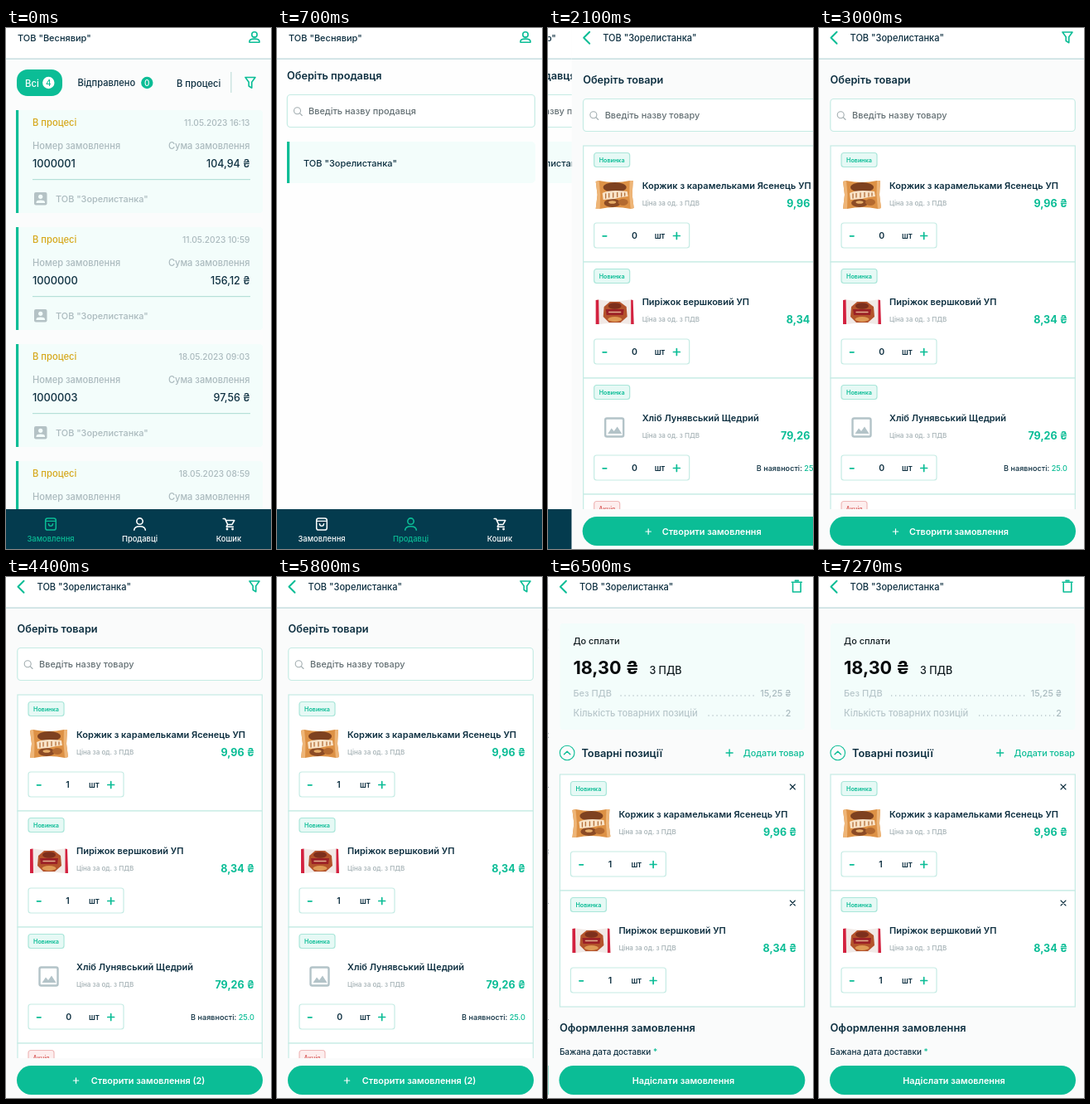
Animation of 320x628 px, one loop 7.43 s. Source, as an HTML page:

```html
<!DOCTYPE html>
<html lang="uk">
<head>
<meta charset="utf-8">
<title>Замовлення</title>
<style>
html, body { margin: 0; width: 100%; height: 100%; overflow: hidden; background: #fff; }
svg { display: block; width: 320px; height: 628px; font-family: Inter, "Noto Sans", sans-serif; }
text { white-space: pre; }
</style>
</head>
<body>
<svg id="stage" viewBox="0 0 320 628" xmlns="http://www.w3.org/2000/svg"></svg>
<script>
const LOOP = 7430;
const GREEN = '#0bbd96', NAVY = '#043b4e', INK = '#0d2f40', GREY = '#abbabe', GOLD = '#d6a81c';
const EDGE = '#c5ebe4', MINT = '#f3fdfb';
const BUYER = 'ТОВ "Веснявир"', SELLER = 'ТОВ "Зорелистанка"';

// y is the middle of the capital letters
const text = (x, y, str, size, fill = INK, weight = 500, anchor = 'start', id = '') =>
  `<text ${id && `id="${id}"`} x="${x}" y="${y + size * 0.36}" font-size="${size}" fill="${fill}" font-weight="${weight}" text-anchor="${anchor}">${str}</text>`;
const rect = (x, y, w, h, fill, r = 0, stroke = 'none') =>
  `<rect x="${x}" y="${y}" width="${w}" height="${h}" rx="${r}" fill="${fill}" stroke="${stroke}" stroke-width="1.2"/>`;
const line = (d, stroke = GREEN, width = 1.5) =>
  `<path d="${d}" fill="none" stroke="${stroke}" stroke-width="${width}" stroke-linecap="round" stroke-linejoin="round"/>`;
const shape = (d, fill) => `<path d="${d}" fill="${fill}"/>`;
const dot = (x, y, r, fill) => `<circle cx="${x}" cy="${y}" r="${r}" fill="${fill}"/>`;
const oval = (x, y, rx, ry, fill) => `<ellipse cx="${x}" cy="${y}" rx="${rx}" ry="${ry}" fill="${fill}"/>`;
const at = (x, y, body, id = '') => `<g ${id && `id="${id}"`} transform="translate(${x} ${y})">${body}</g>`;
const plus = (x, y, r, color = GREEN, width = 1.5) => line(`M${x - r} ${y}h${2 * r}M${x} ${y - r}v${2 * r}`, color, width);

const filterIcon = (x, y) => at(x, y, line('M-6-6.5H6L1.8-.8V6.2L-1.8 4V-.8Z', GREEN, 1.6));
const headerBar = () => rect(0, 0, 320, 37, '#fff') + rect(0, 36.5, 320, 1.4, '#c3dcde');
const personIcon = (x, y, color) => at(x, y,
  `<circle cy="-3.6" r="3.2" fill="none" stroke="${color}" stroke-width="1.6"/>` +
  line('M-6 5.8V4.6C-6 2.6-3 1.6 0 1.6S6 2.6 6 4.6V5.8Z', color, 1.6));
const back = () => line('M21.5 4.8L14.5 11.8L21.5 18.8', GREEN, 2);
const magnifier = (x, y) => at(x, y,
  `<circle cx="-.8" cy="-.8" r="4" fill="none" stroke="#a2adb0" stroke-width="1.1"/>` + line('M2.2 2.2L5 5', '#a2adb0', 1.1));

function tabBar(active) {
  const c = i => i === active ? GREEN : '#fff';
  const bag = at(54, 598,
    `<rect x="-6.3" y="-7" width="12.6" height="14" rx="2.6" fill="none" stroke="${c(0)}" stroke-width="1.5"/>` +
    line('M-6-3.6H6M-2.6-.3C-2.2 3.2 2.2 3.2 2.6-.3', c(0), 1.4));
  const person = at(161.5, 598,
    `<circle cy="-3.4" r="3.7" fill="none" stroke="${c(1)}" stroke-width="1.6"/>` +
    line('M-6.8 7.2C-6.2 1.2 6.2 1.2 6.8 7.2', c(1), 1.6));
  const cart = at(269, 598,
    line('M-6.8-6.6H-4.6L-1.4.4H4L6.8-4.4H-3.4M-1.4.4L-2.8 3.2H5.4', c(2), 1.5) +
    dot(-2, 6, 1.4, c(2)) + dot(4.6, 6, 1.4, c(2)));
  const label = (x, str, i) => text(x, 616, str, 9.4, c(i), 500, 'middle');
  return rect(0, 580, 320, 48, NAVY) + bag + person + cart +
    label(54, 'Замовлення', 0) + label(161.5, 'Продавці', 1) + label(269, 'Кошик', 2);
}

function order(y, date, number, sum) {
  return at(0, y,
    rect(12, 0, 298, 124, MINT, 4) + rect(12, 0, 3.2, 124, GREEN) +
    text(32, 15, 'В процесі', 11.2, GOLD) +
    text(294.5, 15, date, 10.2, GREY, 500, 'end') +
    text(32, 43.5, 'Номер замовлення', 11.1, GREY) +
    text(294.5, 43.5, 'Сума замовлення', 11.1, GREY, 500, 'end') +
    text(32, 64.5, number, 12.8) +
    text(294.5, 64.5, sum, 12.5, INK, 500, 'end') +
    rect(32, 83, 263, 1.2, '#b5e0d8') +
    rect(34, 99, 15.5, 15.5, '#b4c2c5', 2) + dot(41.7, 104.3, 2.6, MINT) +
    shape('M36.5 112V111C36.5 107.8 47 107.8 47 111V112Z', MINT) +
    text(60, 107, SELLER, 10.9, GREY));
}

const orders = () =>
  rect(0, 0, 320, 628, '#fbfcfc') + headerBar() +
  text(14, 12.5, BUYER, 11) + personIcon(300, 11.5, GREEN) +
  rect(13, 50, 55, 32, GREEN, 13) + text(23, 66.5, 'Всі', 11.3, '#fff') +
  dot(51.3, 66, 7.2, '#fff') + text(51.3, 66.2, '4', 10, GREEN, 500, 'middle') +
  text(86.5, 66.5, 'Відправлено', 11.1) +
  dot(170.3, 66, 7.2, GREEN) + text(170.3, 66.2, '0', 10, '#fff', 500, 'middle') +
  text(206, 66.5, 'В процесі', 11.2) +
  rect(271.3, 53, 1.1, 25, '#bcdcd8') + filterIcon(295, 66) +
  order(99, '11.05.2023 16:13', '1000001', '104,94 ₴') +
  order(240, '11.05.2023 10:59', '1000000', '156,12 ₴') +
  order(381, '18.05.2023 09:03', '1000003', '97,56 ₴') +
  order(522, '18.05.2023 08:59', '1000002', '83,40 ₴') +
  tabBar(0);

const sellers = () =>
  rect(0, 0, 320, 628, '#fefefe') + headerBar() +
  text(14, 12.5, BUYER, 11) + personIcon(300, 11.5, GREEN) +
  text(12, 57, 'Оберіть продавця', 12.7, INK, 600) +
  rect(12.3, 80.5, 299, 39, '#fff', 4, EDGE) + magnifier(25.3, 100.5) +
  text(38, 100, 'Введіть назву продавця', 10.95, '#647074') +
  rect(12, 137, 300, 50, MINT, 5) + rect(12, 137, 3.2, 50, GREEN) +
  text(32, 163, SELLER, 11) +
  tabBar(1);

// product pictures, about 46 by 34
const orangePack = () =>
  shape('M29 43L33 42Q52 46 70 42L74 42L73 59L75 75L71 76Q52 72 34 76L29 76L31 59Z', '#dd9145') +
  shape('M29 43L33 42L34.5 59L34 76L29 76L31 59ZM70 42L74 42L73 59L75 75L71 76L69.5 59Z', '#eeb577') +
  oval(52, 50, 14, 6, '#7e4120') + oval(49, 69, 10, 5, '#8c4b25') + oval(49, 68, 4.5, 1.8, '#e6ad68') +
  oval(62, 68, 6, 4, '#b46a30') +
  shape('M37 57Q46 52 67 55L68 61Q58 62 52 64L38 65Z', '#f8e3c8') +
  line('M41 58V63M45 57.5V62M50 57V62M55 56.5V61.5M60 57V61M64 57V60', '#b5703a', 1.3);
const redPack = () =>
  shape('M29 46L33 45.5Q52 49 70 45.5L74 46L73.5 60L75 75L70 75Q52 72 34 75L29 75L30 60Z', '#f1e9e6') +
  shape('M29 46L32.5 45.5L33 75L29 75ZM71.5 45.5L74 46L75 75L71.5 75Z', '#d3213f') +
  shape('M46 48H58L66 54L67 66L59 73H45L38 66L39 54Z', '#b4532b') +
  oval(52, 53, 8, 3.8, '#7d2f1c') + shape('M41 57H63L62 64H42Z', '#9b2126') +
  line('M45 60.5H59', '#e3b08f', 1.4) + oval(52, 69, 8.5, 3, '#de9a55');
const noPicture = () =>
  `<rect x="40.5" y="48.5" width="22" height="22" rx="2" fill="none" stroke="#b3c3c8" stroke-width="2.4"/>` +
  shape('M43.5 67L48 60.5L51 64L55 58.5L60.5 67Z', '#b3c3c8');

const badge = (str, w, fill, bg, edge) =>
  rect(27, 8.5, w, 17, bg, 3, edge) + text(27 + w / 2, 17, str, 7.2, fill, 600, 'middle');

function product(y, name, price, picture, id, qty, extra = '') {
  return at(0, y,
    rect(14, 0, 295.3, 140, '#fff', 0, EDGE) +
    badge('Новинка', 43, GREEN, '#e6f9f5', '#a9e6d9') + picture() +
    text(85, 48, name, 11, INK, 600) +
    text(85, 69.5, 'Ціна за од. з ПДВ', 8.1, '#a3b0b4') +
    text(300, 69.5, price, 12.6, GREEN, 700, 'end') +
    rect(27, 93, 115, 30, '#fff', 3, EDGE) +
    line('M37.5 108.8H42', GREEN, 1.7) + plus(126.7, 108.5, 3.9, GREEN, 1.7) +
    text(72.3, 108.3, qty, 10.5, INK, 600, 'start', id) +
    text(100, 108.3, 'шт', 9.3, INK, 600) + extra);
}
const NAMES = ['Коржик з карамельками Ясенець УП', 'Пиріжок вершковий УП', 'Хліб Лунявський Щедрий'];

const shop = () =>
  rect(0, 0, 320, 628, '#fafbfb') + headerBar() + back() +
  text(37.5, 12.5, SELLER, 11.05) + filterIcon(300, 11.5) +
  text(13.5, 62, 'Оберіть товари', 12.7, INK, 600) +
  rect(13.8, 85.5, 295.5, 39, '#fff', 4, EDGE) + magnifier(27, 105.5) +
  text(40, 105, 'Введіть назву товару', 10.95, '#647074') +
  product(142, NAMES[0], '9,96 ₴', orangePack, 'qtyA', '0') +
  product(282, NAMES[1], '8,34 ₴', redPack, 'qtyB', '0') +
  product(422, NAMES[2], '79,26 ₴', noPicture, 'qtyC', '0',
    text(300, 108.5, `В наявності: <tspan fill="${GREEN}">25.0</tspan>`, 9.15, INK, 500, 'end')) +
  at(0, 562, rect(14, 0, 295.3, 140, '#fff', 0, EDGE) + badge('Акція', 31, '#d9605f', '#fdeeee', '#efb9b9')) +
  rect(0, 580, 320, 48, '#fafbfb') + rect(13, 589, 297, 35, GREEN, 17.5) +
  at(0, 0, plus(0, 607, 3.2, '#fff', 1.2), 'addMark') +
  text(169, 607, '', 10.85, '#fff', 600, 'middle', 'createLabel');

const dots = (x1, x2, y) =>
  `<path d="M${x1} ${y}H${x2}" stroke="#bccace" stroke-width="1.3" stroke-dasharray="1.3 3.7"/>`;
const cross = y => line(`M292 ${y - 3}l6 6m0-6l-6 6`, INK, 1.1);

const basket = () =>
  rect(0, 0, 320, 628, '#fafbfb') + headerBar() + back() +
  text(37.5, 12.5, SELLER, 11.05) +
  line('M295.2 7.5V18H304.8V7.5M294 6.2H306M298 4.4H302', GREEN, 1.6) +
  rect(14, 56, 295.5, 128, MINT, 4) +
  text(30, 77.5, 'До сплати', 10.95, '#111c20') +
  text(30, 109, '18,30 ₴', 21.6, '#05090b', 700) + text(122, 112.5, 'З ПДВ', 12.5, '#111c20') +
  text(30, 140, 'Без ПДВ', 11, '#b8c7cb') + dots(87, 251, 143) +
  text(293, 140, '15,25 ₴', 10.8, '#a9babf', 500, 'end') +
  text(30, 164, 'Кількість товарних позицій', 11.2, '#b8c7cb') + dots(193, 284, 167) +
  text(293, 164, '2', 10.8, '#a9babf', 500, 'end') +
  `<circle cx="22.7" cy="212" r="8.8" fill="none" stroke="${GREEN}" stroke-width="1.1"/>` +
  line('M19 213.8L22.7 210.2L26.4 213.8', GREEN, 1.4) +
  text(40, 212.5, 'Товарні позиції', 12.8, INK, 600) +
  plus(218.7, 212, 4, GREEN, 1.4) + text(309, 212.5, 'Додати товар', 10.8, GREEN, 500, 'end') +
  product(238, NAMES[0], '9,96 ₴', orangePack, 'qtyD', '1', cross(15)) +
  product(378, NAMES[1], '8,34 ₴', redPack, 'qtyE', '1', cross(15)) +
  text(13.5, 543.5, 'Оформлення замовлення', 12.8, INK, 600) +
  text(13.5, 572.5, `Бажана дата доставки <tspan fill="${GREEN}">*</tspan>`, 9.95) +
  rect(13, 589, 297, 35, GREEN, 17.5) +
  text(163, 607, 'Надіслати замовлення', 10.85, '#fff', 600, 'middle');

const $ = id => document.getElementById(id);
$('stage').innerHTML = at(0, 0, orders(), 'orders') + at(0, 0, sellers(), 'sellers') +
  at(0, 0, shop(), 'shop') + at(0, 0, basket(), 'basket');

const SELLERS_AT = 100, SHOP_AT = 1922, TAP_A = 3400, TAP_B = 4300, BASKET_AT = 6102;

// critically damped spring: distance left to travel, 1 to 0
function remaining(t, start) {
  if (t <= start) return 1;
  const u = (t - start) * 0.0225;
  return u > 11 ? 0 : (1 + u) * Math.exp(-u);
}
function place(id, x, shown) {
  $(id).setAttribute('transform', `translate(${x.toFixed(2)} 0)`);
  $(id).style.display = shown ? '' : 'none';
}

function draw(t) {
  const a = remaining(t, SHOP_AT), b = remaining(t, BASKET_AT);
  const drift = r => (r - 1) * 102;
  place('orders', 0, t < SELLERS_AT);
  place('sellers', drift(a), t >= SELLERS_AT && a > 0);
  place('shop', a * 320 + drift(b), a < 1 && b > 0);
  place('basket', b * 320, b < 1);

  const first = t >= TAP_A ? 1 : 0, second = t >= TAP_B ? 1 : 0, count = first + second;
  $('qtyA').textContent = first;
  $('qtyB').textContent = second;
  $('createLabel').textContent = 'Створити замовлення' + (count ? ` (${count})` : '');
  $('createLabel').setAttribute('x', count ? 171.5 : 169);
  $('addMark').setAttribute('transform', `translate(${count ? 84.5 : 92.5} 0)`);
}

const start = performance.now();
function tick() {
  draw((performance.now() - start) % LOOP);
  requestAnimationFrame(tick);
}
tick();
</script>
</body>
</html>
```
